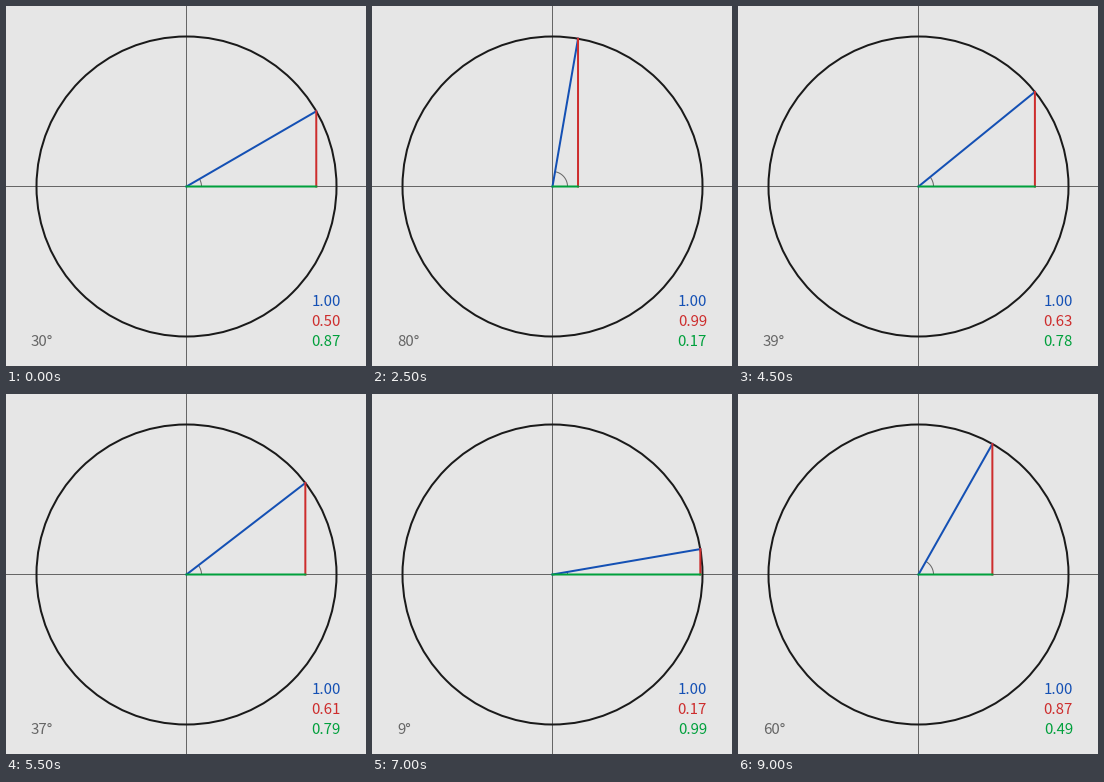
A matplotlib script that plays this animation: 360 px wide and 360 px high, repeating every 9.5 s.

```python
import numpy as np
import matplotlib.pyplot as plt
from matplotlib.animation import FuncAnimation
from matplotlib.patches import Circle

SIZE = 360
MID = SIZE / 2 + 0.5
RADIUS = 150
ARC_RADIUS = 15
STEP_MS = 500

INK, GREY = "#1a1a1a", "#666666"
BLUE, RED, GREEN = "#1450b4", "#cd2d2d", "#00a03c"

# One random-looking angle, in degrees, per half second.
ANGLES = [30.1, 18.4, 73.4, 30.1, 46.4, 80.2, 70.9, 51.0, 48.1, 39.1,
          70.9, 37.6, 78.2, 59.0, 9.75, 44.3, 51.6, 35.2, 60.5]

plt.rcParams["font.family"] = "Noto Sans CJK JP"

# At 72 dpi one point equals one pixel.
fig = plt.figure(figsize=(SIZE / 72, SIZE / 72), dpi=72, facecolor="#e6e6e6")
ax = fig.add_axes([0, 0, 1, 1])
ax.set_xlim(0, SIZE)
ax.set_ylim(SIZE, 0)
ax.axis("off")


def stroke(color, width, z, xs=(), ys=(), cap="projecting"):
    return ax.plot(xs, ys, color=color, lw=width, zorder=z, snap=False,
                   solid_capstyle=cap)[0]


def label(x, y, color, align):
    return ax.text(x, y, "", color=color, fontsize=15, ha=align, va="baseline")


stroke(GREY, 1, 1, (0, SIZE), (MID, MID))
stroke(GREY, 1, 1, (MID, MID), (0, SIZE))
ax.add_patch(Circle((MID, MID), RADIUS, fill=False, ec=INK, lw=2, zorder=2))

arc = stroke(GREY, 1, 3, cap="butt")
radius_line = stroke(BLUE, 2, 4)
sin_line = stroke(RED, 2, 5)
cos_line = stroke(GREEN, 2, 6)

angle_text = label(25, 340, GREY, "left")
radius_text = label(335, 300, BLUE, "right")
sin_text = label(335, 320, RED, "right")
cos_text = label(335, 340, GREEN, "right")


def update(i):
    deg = ANGLES[i % len(ANGLES)]
    a = np.radians(deg)
    s, c = np.sin(a), np.cos(a)
    x, y = MID + RADIUS * c, MID - RADIUS * s

    t = np.linspace(0, a, 40)
    arc.set_data(MID + ARC_RADIUS * np.cos(t), MID - ARC_RADIUS * np.sin(t))
    radius_line.set_data((MID, x), (MID, y))
    sin_line.set_data((x, x), (y, MID))
    cos_line.set_data((MID, x), (MID, MID))

    angle_text.set_text(f"{int(deg)}°")
    radius_text.set_text("1.00")
    sin_text.set_text(f"{s:.2f}")
    cos_text.set_text(f"{c:.2f}")
    return (arc, radius_line, sin_line, cos_line,
            angle_text, radius_text, sin_text, cos_text)


anim = FuncAnimation(fig, update, frames=len(ANGLES), interval=STEP_MS,
                     repeat=True, repeat_delay=0, blit=False)
plt.show()
```
